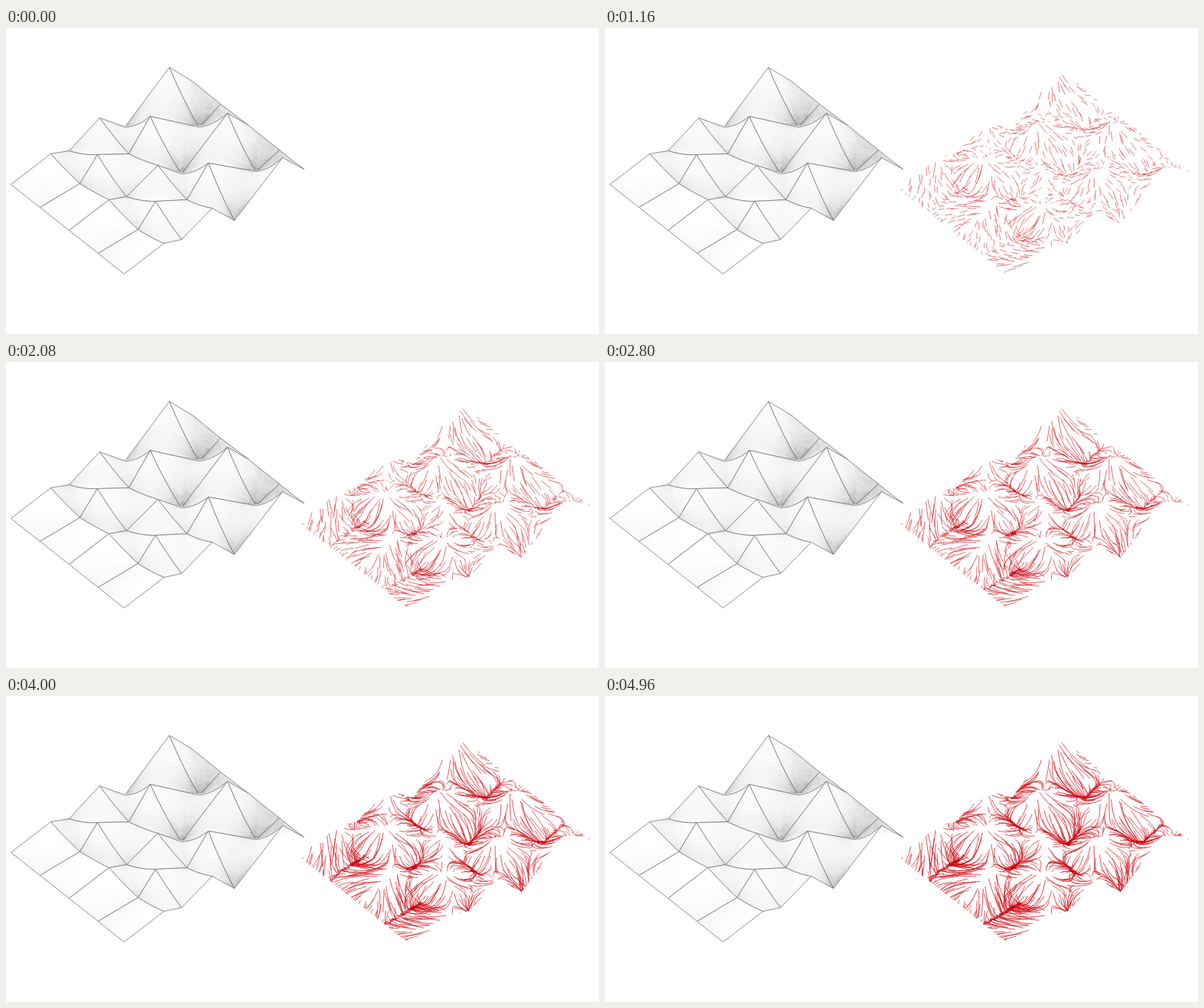
Recreate the animation shown at these times as an HTML page with a canvas. Size 775 by 400 pixels, loop 5 s.

```html
<!DOCTYPE html>
<html lang="en">
<head>
<meta charset="utf-8">
<title>Downhill flow</title>
<style>
  html, body { margin: 0; width: 100%; height: 100%; overflow: hidden; background: #fff; }
  canvas { display: block; }
</style>
</head>
<body>
<canvas id="stage" width="775" height="400"></canvas>
<script>
const LOOP = 5000, FRAME = 40, STEPS = 125, STRIDE = 3;
const COLS = 4, ROWS = 6;
const OFFSET = { x: 376, y: 5 };

// Projected corners of the terrain grid, one row per line.
const rows = [
  [6,204, 44,234, 82,264, 120,294, 154,321],
  [58,164, 96,203, 134,224, 172,263, 206,281],
  [82,160, 119,165, 157,220, 195,226, 229,276],
  [122,117, 160,164, 198,179, 236,224, 269,235],
  [155,129, 188,115, 229,190, 264,176, 298,251],
  [213,51, 252,129, 289,111, 326,187, 361,169],
  [243,69, 280,99, 317,127, 357,159, 389,184]
];

// Each corner also gets its ground distance w and its height h above the base plane.
const grid = rows.map(row => Array.from({ length: COLS + 1 }, (_, i) => {
  const x = row[2 * i], y = row[2 * i + 1];
  const w = (x - 6 - 37 * i) / 39.5;
  return { x, y, w, h: 204 + 29.2 * i - 22.5 * w - y };
}));

const clamp = (v, lo, hi) => Math.max(lo, Math.min(hi, v));
const mix = (a, b, t) => a + (b - a) * t;

function hash(n) {
  const s = Math.sin(n * 127.1 + 11.7) * 43758.5453;
  return s - Math.floor(s);
}

function cellAt(a, b) {
  const i = clamp(Math.floor(a), 0, COLS - 1), j = clamp(Math.floor(b), 0, ROWS - 1);
  return { i, j, s: a - i, t: b - j,
    p: grid[j][i], q: grid[j][i + 1], r: grid[j + 1][i], o: grid[j + 1][i + 1] };
}

const blend = (c, key) =>
  mix(mix(c.p[key], c.q[key], c.s), mix(c.r[key], c.o[key], c.s), c.t);
const slopeA = (c, key) => mix(c.q[key] - c.p[key], c.o[key] - c.r[key], c.t);
const slopeB = (c, key) => mix(c.r[key] - c.p[key], c.o[key] - c.q[key], c.s);

// The valleys are rounded across the rows, so the surface sags between corners.
function point(a, b) {
  const c = cellAt(a, b);
  const sag = 0.3 * c.s * (1 - c.s) * Math.abs(slopeA(c, 'h'));
  return [blend(c, 'x'), blend(c, 'y') + sag];
}

function shade(c) {
  const heights = [c.p.h, c.q.h, c.r.h, c.o.h];
  const low = Math.min(...heights), span = Math.max(...heights) - low;
  const level = (blend(c, 'h') - low) / span;
  const angle = Math.atan2(c.t - Math.round(c.t), c.s - Math.round(c.s));
  const facet = 0.75 + 0.5 * hash(Math.floor(angle * 6) + c.i * 31 + c.j * 57);
  const dark = 0.3 * Math.pow(span / 45, 1.8) * Math.pow(1 - level, 3.6) * facet;
  return Math.round(255 * (1 - Math.min(dark + (c.j ? 0.018 : 0), 0.35)));
}

function tracePolygon(g, points) {
  g.beginPath();
  points.forEach(([x, y], k) => k ? g.lineTo(x, y) : g.moveTo(x, y));
  g.closePath();
}

function cellOutline(i, j) {
  const n = 10, points = [];
  const e = 0.9999;
  for (let k = 0; k <= n; k++) points.push(point(i + e * k / n, j));
  for (let k = n; k >= 0; k--) points.push(point(i + e * k / n, j + e));
  return points;
}

function paintTerrain() {
  const layer = document.createElement('canvas');
  layer.width = 400;
  layer.height = 400;
  const g = layer.getContext('2d'), n = 14, d = 1 / n;
  g.translate(0.5, 0.5);
  for (let j = ROWS - 1; j >= 0; j--) {
    for (let i = 0; i < COLS; i++) {
      for (let v = n - 1; v >= 0; v--) {
        for (let u = 0; u < n; u++) {
          const a = i + u * d, b = j + v * d, e = 0.9999 * d;
          const tone = shade(cellAt(a + d / 2, b + d / 2));
          g.fillStyle = g.strokeStyle = `rgb(${tone},${tone},${tone})`;
          g.lineWidth = 0.5;
          tracePolygon(g, [point(a, b), point(a + e, b), point(a + e, b + e), point(a, b + e)]);
          g.fill();
          g.stroke();
        }
      }
      g.strokeStyle = '#4a4a4a';
      g.lineWidth = 0.6;
      tracePolygon(g, cellOutline(i, j));
      g.stroke();
    }
  }
  return layer;
}

// A particle slides downhill with inertia and a slight veer, leaving its trail.
function slide(a, b, veer) {
  const trail = [], cos = Math.cos(veer), sin = Math.sin(veer);
  let va = 0, vb = 0;
  for (let k = 0; k <= STEPS; k++) {
    trail.push(point(a, b));
    const c = cellAt(a, b);
    const wb = Math.max(slopeB(c, 'w'), 0.3);
    const ga = slopeA(c, 'h'), gw = slopeB(c, 'h') / wb;
    const pace = 0.0058 * (1 + 0.75 * clamp((2.2 - b) / 0.4, 0, 1)) / (Math.hypot(ga, gw) + 3);
    const keep = k ? 0.955 : 0;
    va = mix(-(ga * cos - gw * sin) * pace, va, keep);
    vb = mix(-(ga * sin + gw * cos) * pace / wb, vb, keep);
    const inside = a + va >= 0 && a + va <= COLS && b + vb >= 0 && b + vb <= ROWS;
    if (inside) {
      a += va;
      b += vb;
    }
  }
  return trail;
}

function seedTrails() {
  const trails = [], across = 23;
  let id = 0;
  for (let j = 0; j < ROWS; j++) {
    const lines = Math.round((rows[j + 1][4] - rows[j][4]) / 6.3);
    for (let v = 0; v < lines; v++) {
      for (let u = 0; u < across; u++) {
        const a = (u + hash(++id)) / across * COLS;
        const b = j + (v + hash(id + 5000)) / lines;
        trails.push(slide(a, b, (hash(id + 9000) - 0.5) * 0.6));
      }
    }
  }
  return trails;
}

const ctx = document.getElementById('stage').getContext('2d');
const terrain = paintTerrain();
const trails = seedTrails();

function draw(time) {
  const step = Math.floor((time % LOOP) / FRAME);
  ctx.fillStyle = '#fff';
  ctx.fillRect(0, 0, 775, 400);
  ctx.drawImage(terrain, 0, 0);
  if (step) {
    ctx.save();
    ctx.translate(OFFSET.x, OFFSET.y);
    ctx.globalAlpha = Math.min(1, 0.65 + step / 350);
    ctx.strokeStyle = '#cc0810';
    ctx.lineWidth = 0.75;
    for (const trail of trails) {
      ctx.beginPath();
      ctx.moveTo(...trail[0]);
      for (let k = STRIDE; k < step; k += STRIDE) ctx.lineTo(...trail[k]);
      ctx.lineTo(...trail[step]);
      ctx.stroke();
    }
    ctx.restore();
  }
}

const start = performance.now();
function tick() {
  draw(performance.now() - start);
  requestAnimationFrame(tick);
}
tick();
</script>
</body>
</html>
```
